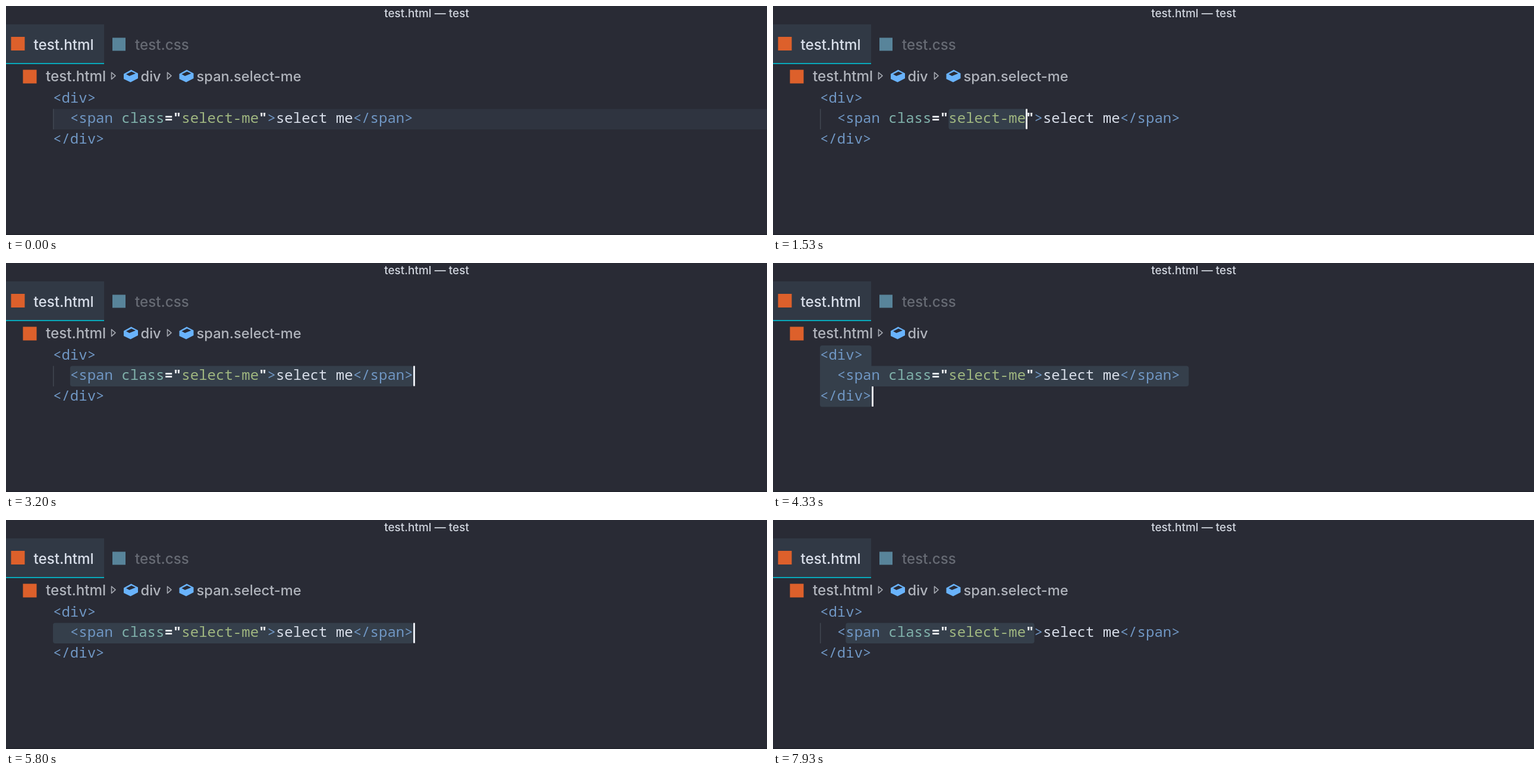
Animation, 1280 px wide and 386 px high, one loop 8 s. Source, as an HTML page:

```html
<!DOCTYPE html>
<html lang="en">
<head>
<meta charset="utf-8">
<title>Expand selection</title>
<style>
  html, body { margin: 0; width: 100%; height: 100%; overflow: hidden; background: #292b35; }
  svg { display: block; width: 1280px; height: 386px; }
  text { white-space: pre; }
  .ui { font: 450 23.7px Inter, sans-serif; fill: #b0b4bc; }
  .ui.file { font-size: 24.2px; }
  .ui.title { font-size: 19px; font-weight: 500; fill: #d0d5de; }
  .code { font: 450 24.04px "Noto Sans Mono", monospace; fill: #d8dee9; }
  .tag { fill: #7097c4; }
  .attr { fill: #80b2ab; }
  .str { fill: #a0b780; }
  .punct { fill: #eceff4; font-weight: 700; }
  .sel { fill: #353f4b; }
  .caret { fill: #e9ecf2; }
  .chevron { fill: none; stroke: #a5a9b1; stroke-width: 1.6; stroke-linejoin: round; }
</style>
</head>
<body>
<svg viewBox="0 0 1280 386">
  <defs>
    <path id="cube" fill="#69b3fc" fill-rule="evenodd"
      d="M0 7L12.500 0L24 6V14.500L11.500 21L0 15.500ZM4 7.500L9.500 10.500L20 6.300L13 3Z"/>
    <path id="chevron" class="chevron" d="M0 0L6.500 5.700L0 11.400Z"/>
  </defs>

  <rect width="1280" height="386" fill="#292b35"/>
  <rect y="384" width="1280" height="2" fill="#22242d"/>
  <text class="ui title" x="707.500" y="19" text-anchor="middle">test.html — test</text>

  <rect y="31" width="165" height="66" fill="#313945"/>
  <rect y="96" width="165" height="2" fill="#08a9ba"/>
  <rect x="8.500" y="52" width="23" height="23" fill="#dd602b"/>
  <text class="ui file" x="46.500" y="74" style="fill:#d8dee9">test.html</text>
  <rect x="179" y="53.500" width="22" height="22" fill="#58849a"/>
  <text class="ui file" x="217" y="74" style="fill:#666a73">test.css</text>

  <rect x="28.500" y="107.500" width="23" height="23" fill="#dd602b"/>
  <text class="ui file" x="67" y="127">test.html</text>
  <use href="#chevron" x="177.500" y="112"/>
  <use href="#cube" x="198" y="107.500"/>
  <text class="ui" x="226.500" y="127">div</text>
  <g id="crumb">
    <use href="#chevron" x="271.500" y="112"/>
    <use href="#cube" x="291.500" y="107.500"/>
    <text class="ui" x="320.500" y="127">span.select-me</text>
  </g>

  <rect id="line" x="79" y="173.500" width="1201" height="34.500" fill="#2f3440"/>
  <g id="sel"></g>
  <rect id="guide" x="79" y="173.500" width="1.500" height="34.500" fill="#414651"/>

  <text class="code tag" x="79" y="162.500">&lt;div&gt;</text>
  <text class="code" x="107.850" y="197"><tspan class="tag">&lt;span </tspan><tspan class="attr">class</tspan><tspan class="punct">="</tspan><tspan class="str">select-me</tspan><tspan class="punct">"</tspan><tspan class="tag">&gt;</tspan>select me<tspan class="tag">&lt;/span&gt;</tspan></text>
  <text class="code tag" x="79" y="231.500">&lt;/div&gt;</text>
  <rect id="caret" class="caret" width="3" height="34"/>
</svg>
<script>
  const LOOP = 8000, BLINK = 500, LEFT = 79, TOP = 139, CHAR = 14.425, ROW = 34.5;
  const $ = id => document.getElementById(id);

  // box: [from column, to column, first row, row count]; caret: [column, row]
  const inRow = (from, to) => ({ boxes: [[from, to, 1, 1]], caret: [to, 1] });
  const idle = { boxes: [], caret: [18, 1] };
  const word = { boxes: [[15, 21, 1, 1], [26, 32, 1, 1]], caret: [21, 1] };
  const value = inRow(15, 24);
  const quoted = inRow(14, 25);
  const attribute = inRow(8, 25);
  const tagBody = inRow(3, 25);
  const element = inRow(2, 42);
  const fullLine = inRow(0, 42);
  const inner = { boxes: [[5, 6, 0, 1.3], [0, 43, 1, 1]], caret: [0, 2] };
  const all = { boxes: [[0, 6, 0, 3], [0, 43, 1, 1]], caret: [6, 2] };

  const steps = [
    [-250, idle], [750, word], [1180, value], [1610, quoted], [2040, attribute],
    [2470, tagBody], [2900, element], [3330, fullLine], [3760, inner], [4190, all],
    [5050, inner], [5450, fullLine], [5850, element], [6250, tagBody]
  ];

  const show = (id, on) => $(id).setAttribute("visibility", on ? "visible" : "hidden");
  const colX = col => LEFT + col * CHAR;
  const rowY = row => TOP + row * ROW;

  const box = ([from, to, row, rows]) =>
    `<rect class="sel" rx="4" x="${colX(from)}" y="${rowY(row)}" ` +
    `width="${(to - from) * CHAR}" height="${rows * ROW}"/>`;

  let current;
  function apply(state) {
    current = state;
    const [col, row] = state.caret;
    $("sel").innerHTML = state.boxes.map(box).join("");
    $("caret").setAttribute("x", Math.round(colX(col)));
    $("caret").setAttribute("y", rowY(row));
    show("line", state === idle);
    show("guide", ![fullLine, inner, all].includes(state));
    show("crumb", row === 1);
  }

  const start = performance.now();
  function frame() {
    const t = (performance.now() - start) % LOOP;
    const [since, state] = steps.findLast(([at]) => at <= t);
    if (state !== current) apply(state);
    // the idle caret begins in its dark half
    const phase = Math.floor((t - since) / BLINK) + (state === idle ? 1 : 0);
    show("caret", phase % 2 === 0);
    requestAnimationFrame(frame);
  }
  frame();
</script>
</body>
</html>
```
